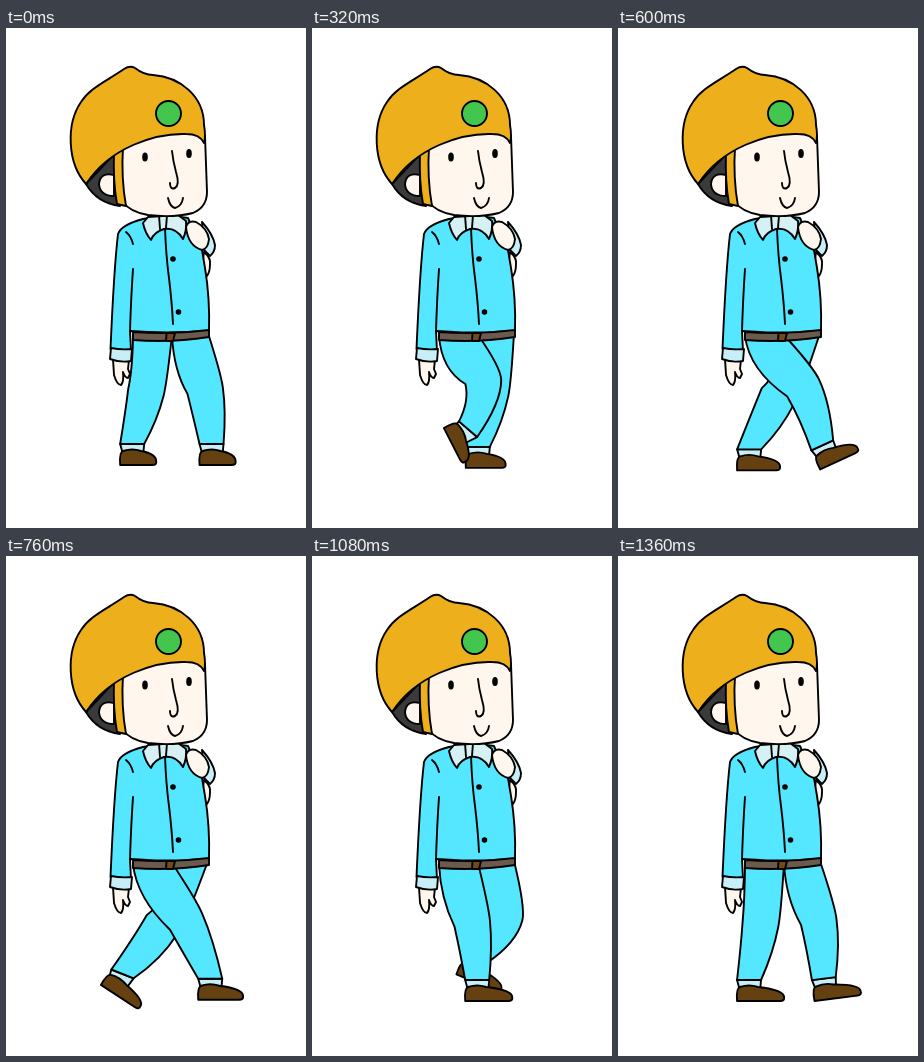
An HTML page for the animation above (1.4 s loop, 300 px wide and 500 px high).

```html
<!DOCTYPE html>
<html lang="en">
<head>
<meta charset="utf-8">
<title>Walking worker</title>
<style>
  html, body { margin: 0; width: 100%; height: 100%; overflow: hidden; background: #fff; }
  svg { display: block; width: 100vw; height: 100vh; stroke: #000; stroke-width: 1.9; stroke-linejoin: round; stroke-linecap: round; fill: none; }
  .suit { fill: #55e7ff; }
  .pale { fill: #c8eff8; }
  .collar { fill: #d6f1f4; }
  .skin { fill: #fff7ed; }
  .gold { fill: #edb01c; }
  .shoe { fill: #654010; }
  .hair { fill: #3a3a3a; }
  .dot { fill: #000; stroke: none; }
</style>
</head>
<body>
<svg viewBox="0 0 300 500">
  <path class="skin" d="M107 331L108 347Q111 357 115 357Q118 354 117 344Q119 350 122 350L124 346L122 341L123 332Z"/>

  <g id="far"><path class="pale"/><path class="shoe"/><path class="suit"/></g>
  <g id="near"><path class="pale"/><path class="shoe"/><path class="suit"/></g>

  <!-- arms and torso -->
  <path class="pale" d="M196 194Q207 206 209 217Q209 224 204 228L198 222Z"/>
  <path class="skin" d="M198 224Q205 230 204 236Q204 244 201 248L196 240Z"/>
  <path class="suit" d="M137 191Q115 197 112 206Q108 240 104.500 321L125 323L124 303Q160 306 203 303Q204 270 199 240L196 222L182 190L160 187Z"/>
  <path d="M127 241Q125 270 124 303M120 204Q125 208 127 216M159 200Q160 228 163 250Q166 275 167 296"/>
  <path class="pale" d="M105 320Q115 322 126 321L125 333Q115 335 104 331Z"/>
  <path class="collar" d="M142 189L137 195Q139 205 145 212Q148 204 158 201Q170 199 177 211Q181 202 180 193L172 187Z"/>
  <path d="M153 187L154 201M161 187L160 200"/>
  <path class="skin" d="M180 199Q182 192 190 194Q201 200 203 211Q202 221 196 222Q182 218 180 199Z"/>
  <circle class="dot" cx="167" cy="231" r="2.8"/>
  <circle class="dot" cx="172.5" cy="284" r="2.8"/>

  <path fill="#6b5a4e" d="M127 304Q165 307 203 302L203 309Q165 315 127 312Z"/>
  <path fill="#75471b" d="M160.500 305L169 305L167 313L160 313Z"/>

  <!-- head -->
  <path class="hair" d="M80 156L112 122L114 178Q91 175 80 156Z"/>
  <path class="skin" d="M108 147Q94 144 93 156Q94 168 108 168Z"/>
  <path class="skin" d="M112 122L117 174Q124 184 142 187Q167 190 187 185Q201 179 201 164L199 108L150 100Z"/>
  <path class="gold" d="M108 124L117 119Q115 150 120 178L111 176Q107 154 108 124Z"/>
  <path class="gold" d="M80 156C61 135 60 96 75 74C84 60 99 54 118 41Q124 37 129 40Q138 47 147 47C174 49 198 68 198 97Q200 108 198 115Q194 106 180 106C150 105 104 119 80 156Z"/>
  <circle cx="162.500" cy="85.500" r="12.500" fill="#42c64e"/>
  <ellipse class="dot" cx="139" cy="129" rx="2.800" ry="4.500"/>
  <ellipse class="dot" cx="183" cy="125.500" rx="2.800" ry="4.500"/>
  <path d="M166 123Q167 133 170 144Q174 157 169 160Q164 162 164 155M162 170Q164 179 169 180Q176 178 177 170"/>
</svg>
<script>
const LOOP = 1400, STEP = 40, SWING = 680;

// Key points of a swinging foot: progress, share of the stride, lift, angle
const SWING_KEYS = [
  [0, 0, 0, 0], [.2, -.24, 32, 70], [.38, 0, 48, 92],
  [.65, .63, 15, -10], [.88, 1, 1, -25], [1, 1, 0, 0]
];

const legs = [
  { id: 'far', back: [166, 307], front: [202, 305], land: 196, pace: .124, shift: LOOP / 2 },
  { id: 'near', back: [127, 308], front: [166, 307], land: 202, pace: .122, shift: 0 }
];

const add = (p, d, k = 1) => [p[0] + d[0] * k, p[1] + d[1] * k];
const sub = (p, q) => add(p, q, -1);
const mix = (p, q, k) => add(p, sub(q, p), k);
const turn = ([x, y], a) => [x * Math.cos(a) - y * Math.sin(a), x * Math.sin(a) + y * Math.cos(a)];
const pt = p => p[0].toFixed(2) + ' ' + p[1].toFixed(2);

// Smooth curve through the key points
function spline(keys, s) {
  const i = Math.max(0, keys.findIndex(k => k[0] > s) - 1);
  const [a, b] = [keys[i], keys[i + 1]];
  const before = keys[i - 1] || a, after = keys[i + 2] || b;
  const span = b[0] - a[0], u = (s - a[0]) / span;
  return [1, 2, 3].map(k => {
    const m = (b[k] - before[k]) / (b[0] - before[0]) * span;
    const n = (after[k] - a[k]) / (after[0] - a[0]) * span;
    return a[k] + (b[k] - a[k]) * u * u * (3 - 2 * u) + u * (1 - u) * ((1 - u) * m - u * n);
  });
}

// The foot slides back evenly on the ground, then swings forward
function step({ land, pace, shift }, t) {
  const p = (t + shift) % LOOP, ground = 437 + 8 * Math.min(1, t / 900);
  if (p >= SWING) return { heel: [land - pace * (p - SWING), ground], angle: 0, bend: 4 };
  const s = p / SWING, stride = pace * (LOOP - SWING);
  const [share, lift, deg] = spline(SWING_KEYS, s);
  return {
    heel: [land - stride * (1 - share), ground - lift],
    angle: deg * Math.PI / 180,
    bend: 4 + 16 * Math.sin(Math.PI * s)
  };
}

function drawLeg(leg, t) {
  const { heel, angle, bend } = step(leg, t);
  const foot = (x, y) => add(heel, turn([x, y], angle));
  const f = (x, y) => pt(foot(x, y));
  const len = 36 + 11 * Math.min(1, t / 960);

  const hip = mix(leg.back, leg.front, .5), ankle = foot(12, -21);
  const axis = sub(ankle, hip), size = Math.hypot(...axis);
  const side = [axis[1] / size, -axis[0] / size];
  const knee = add(mix(hip, ankle, .52), side, bend);
  const [kneeBack, kneeFront] = [-18, 18].map(w => add(knee, side, w));
  const [hemBack, hemFront] = [-12, 12].map(w =>
    add(ankle, turn([w, 0], angle > 0 ? angle * .65 : angle)));

  const seat = [leg.back[0] + .1 * (kneeBack[0] - leg.back[0]), 342];
  const calf = add(kneeBack, sub(hemBack, leg.back), .2);
  const shin = add(kneeFront, sub(hemFront, leg.front), .22);
  const thigh = add(kneeFront, sub(hemFront, leg.front), -.12);

  const shapes = [
    `M${pt(hemBack)}L${f(3, -10)}L${f(23, -10)}L${pt(hemFront)}Z`,
    `M${f(0, 0)}Q${f(-1, -13)} ${f(3, -14)}Q${f(12, -17)} ${f(21, -14)}` +
      `Q${f(len, -11)} ${f(len, -4)}Q${f(len + 1, 0)} ${f(len - 4, 0)}Z`,
    `M${pt(leg.back)}Q${pt(seat)} ${pt(kneeBack)}Q${pt(calf)} ${pt(hemBack)}L${pt(hemFront)}` +
      `Q${pt(shin)} ${pt(kneeFront)}Q${pt(thigh)} ${pt(leg.front)}Z`
  ];
  const parts = document.getElementById(leg.id).children;
  shapes.forEach((d, i) => parts[i].setAttribute('d', d));
}

function tick() {
  const t = Math.floor(performance.now() % LOOP / STEP) * STEP;
  legs.forEach(leg => drawLeg(leg, t));
  requestAnimationFrame(tick);
}
tick();
</script>
</body>
</html>
```
